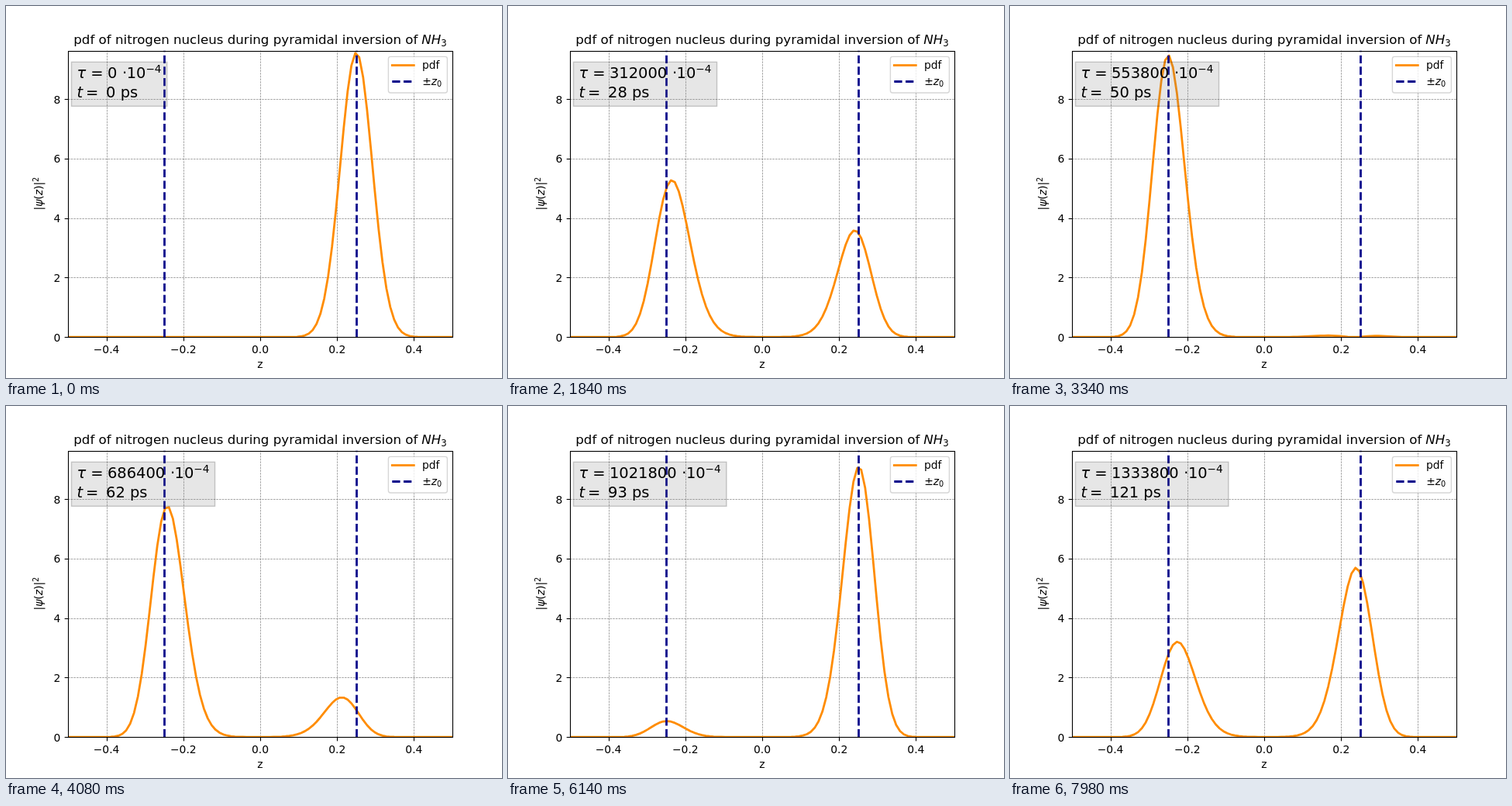
An HTML page that plays this animation: 640x480 px, repeating every 8 s.

```html
<!DOCTYPE html>
<html lang="en">
<head>
<meta charset="utf-8">
<title>Pyramidal inversion</title>
<style>
  html, body { margin: 0; width: 100%; height: 100%; overflow: hidden; background: #fff; }
  svg { display: block; width: 640px; height: 480px; }
  text { font-family: "DejaVu Sans", sans-serif; font-size: 13.89px; white-space: pre; }
  .i { font-style: oblique; }
  .title { font-size: 16.667px; }
  .note { font-size: 19.444px; }
  .mid { text-anchor: middle; }
  .end { text-anchor: end; }
  .grid { stroke: #808080; stroke-width: .7; stroke-dasharray: 2.57 1.11; }
  .axis { stroke: #000; stroke-width: 1.11; fill: none; }
  .pdf { stroke: #ff8c00; stroke-width: 2.78; fill: none; stroke-linejoin: round; }
  .well { stroke: #00008b; stroke-width: 2.78; stroke-dasharray: 10.28 4.44; }
</style>
</head>
<body>
<svg viewBox="0 0 640 480">
  <clipPath id="area"><rect x="80" y="57.6" width="496" height="369.6"/></clipPath>
  <g id="grid"></g>
  <g clip-path="url(#area)">
    <path id="curve" class="pdf"/>
    <path class="well" d="M204.5 427.2V57.6"/>
    <path class="well" d="M452.5 427.2V57.6"/>
  </g>
  <rect class="axis" x="80.5" y="58.5" width="496" height="369"/>
  <g id="ticks"></g>

  <text class="title" x="87.3" y="49.3">pdf of nitrogen nucleus during pyramidal inversion of</text>
  <text class="title i" x="536.3" y="49.3">NH</text>
  <text x="561.3" y="52.1" style="font-size:11.67px">3</text>
  <text class="mid" x="328" y="467">z</text>
  <g transform="translate(47 263.5) rotate(-90)">
    <text>|<tspan class="i">ψ</tspan>(<tspan class="i">z</tspan>)|</text>
    <text x="36.6" y="-5.3" style="font-size:9.72px">2</text>
  </g>

  <rect id="box" x="84.5" y="72.3" height="57" fill="#808080" fill-opacity=".2" stroke="#000" stroke-opacity=".2" stroke-width="1.39"/>
  <g>
    <text class="note i" x="91.5" y="93.4">τ</text>
    <text class="note" x="109.2" y="93.4">=</text>
    <text class="note" id="tau" x="131" y="93.4"></text>
    <g id="power">
      <text class="note" x="0" y="93.4">·</text>
      <text class="note" x="5.6" y="93.4">10</text>
      <text x="30.3" y="86.2" style="font-size:13.61px">−4</text>
    </g>
    <text class="note i" x="91.5" y="118">t</text>
    <text class="note" x="102.9" y="118">=</text>
    <text class="note" id="time" x="129.1" y="118"></text>
  </g>

  <rect x="493.4" y="65.4" width="76" height="46.6" rx="2.78" fill="#fff" fill-opacity=".8" stroke="#ccc" stroke-opacity=".8" stroke-width="1.39"/>
  <path class="pdf" d="M496.9 76.5H527.7"/>
  <path class="well" d="M498.3 97.5H526.1"/>
  <text x="536.9" y="81">pdf</text>
  <text x="537.2" y="102">±</text>
  <text class="i" x="548.8" y="102">z</text>
  <text x="556.1" y="104.2" style="font-size:9.72px">0</text>
</svg>
<script>
const $ = id => document.getElementById(id);
const X = z => 80 + 496 * (z + 0.5);
const Y = p => 427.2 - 38.37 * p;
const RAD = Math.PI / 180;

// Axes
const snap = v => Math.floor(v + 0.5) + 0.5;
let grid = '', ticks = '';
for (const v of [-0.4, -0.2, 0, 0.2, 0.4]) {
  const x = snap(X(v)), label = v.toFixed(1).replace('-', '−');
  grid += `<path class="grid" d="M${x} 427.2V57.6"/>`;
  ticks += `<path class="axis" d="M${x} 427.5v4.86"/><text class="mid" x="${X(v)}" y="448">${label}</text>`;
}
for (const v of [0, 2, 4, 6, 8]) {
  const y = snap(Y(v));
  grid += `<path class="grid" d="M80 ${y}H576"/>`;
  ticks += `<path class="axis" d="M80.5 ${y}h-4.86"/><text class="end" x="70.3" y="${Y(v) + 5.3}">${v}</text>`;
}
$('grid').innerHTML = grid;
$('ticks').innerHTML = ticks;

// Eigenstates of a quartic double well on the half line z > 0
const N = 50, H = 1 / 99, K = 1 / (2 * H * H), BARRIER = 620;
const zs = Array.from({ length: N }, (_, i) => (i + 0.5) * H);
const dot = (a, b) => a.reduce((s, v, i) => s + v * b[i], 0) * H;

function solve(diag, rhs) {
  const c = [], d = [];
  for (let i = 0; i < N; i++) {
    const m = diag[i] + (i ? K * c[i - 1] : 0);
    c[i] = -K / m;
    d[i] = (rhs[i] + (i ? K * d[i - 1] : 0)) / m;
  }
  for (let i = N - 2; i >= 0; i--) d[i] -= c[i] * d[i + 1];
  return d;
}

function eigenstates(parity, count) {
  const diag = zs.map((z, i) => 2 * K + BARRIER * (1 - 16 * z * z) ** 2 - (i ? 0 : parity * K));
  const found = [];
  while (found.length < count) {
    let v = zs.map((z, i) => Math.sin(1 + i * i * 0.37) + 0.3);
    for (let k = 0; k < 120; k++) {
      v = solve(diag, v);
      for (const u of found) {
        const p = dot(u, v);
        v = v.map((a, i) => a - p * u[i]);
      }
      const s = Math.sign(v[35]) / Math.sqrt(dot(v, v));
      v = v.map(a => a * s);
    }
    found.push(v);
  }
  return found;
}

const SIGMA = 0.0417;
const packet = zs.map(z =>
  Math.exp(-((z - 0.25) ** 2) / (4 * SIGMA ** 2)) / Math.sqrt(SIGMA * Math.sqrt(2 * Math.PI)));
const even = eigenstates(1, 3), odd = eigenstates(-1, 3);
const weigh = u => { const c = dot(u, packet) / 2; return u.map(a => a * c); };
const evenPart = even.map(weigh), oddPart = odd.map(weigh);

// Phase advance per step in degrees: doublet mean and half splitting
const mean = [0, 95.95, 4680 / 71], half = [180 / 142, 92, 450 / 71];

function density(n) {
  const p = [];
  for (let i = 0; i < N; i++) {
    let rr = 0, ri = 0, lr = 0, li = 0;
    for (let v = 0; v < 3; v++) {
      const a = -(mean[v] - half[v]) * n * RAD, b = -(mean[v] + half[v]) * n * RAD;
      const e = evenPart[v][i], o = oddPart[v][i];
      const er = e * Math.cos(a), ei = e * Math.sin(a);
      const or = o * Math.cos(b), oi = o * Math.sin(b);
      rr += er + or; ri += ei + oi;
      lr += er - or; li += ei - oi;
    }
    p[N + i] = n ? rr * rr + ri * ri : packet[i] ** 2;
    p[N - 1 - i] = n ? lr * lr + li * li : 0;
  }
  return p;
}

function draw(n) {
  const pts = density(n).map((p, k) => X(-0.5 + k * H).toFixed(2) + ' ' + Y(p).toFixed(2));
  $('curve').setAttribute('d', 'M' + pts.join('L'));
  const tau = String(n * 7800), grow = 12.37 * (tau.length - 1);
  $('tau').textContent = tau;
  $('time').textContent = Math.floor(n * 0.7117) + ' ps';
  $('box').setAttribute('width', 123.2 + grow);
  $('power').setAttribute('transform', `translate(${150.1 + grow} 0)`);
}

// Steps last 20, 100 and 20 ms in turn
function stepAt(ms) {
  const r = ms % 140;
  return 3 * Math.floor(ms / 140) + (r >= 20) + (r >= 120);
}

let shown = -1;
const start = performance.now();
function tick(now) {
  const n = stepAt(Math.max(0, now - start) % 8000);
  if (n !== shown) draw(shown = n);
  requestAnimationFrame(tick);
}
draw(shown = 0);
requestAnimationFrame(tick);
</script>
</body>
</html>
```
